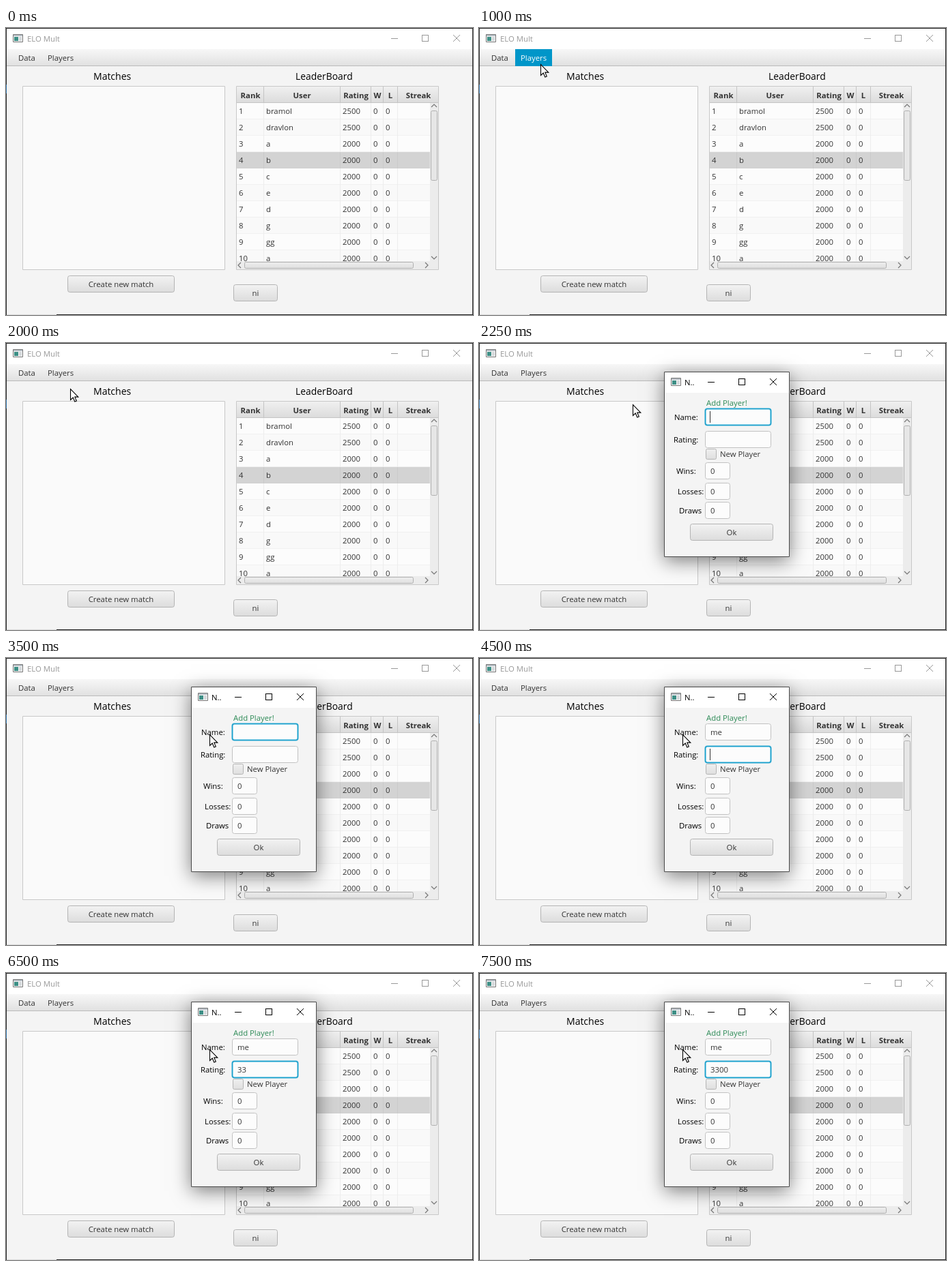
An HTML page with a canvas that plays this animation: 684x421 px, repeating every 8 s.

```html
<!DOCTYPE html>
<html lang="en">
<head>
<meta charset="utf-8">
<title>Ranking app</title>
<style>
  html, body { margin: 0; width: 100%; height: 100%; overflow: hidden; background: #222; }
  canvas { display: block; }
</style>
</head>
<body>
<canvas id="stage" width="684" height="421"></canvas>
<script>
const ctx = document.getElementById('stage').getContext('2d');
const BLUE = '#0096c9', BODY = '#f4f4f4', INK = '#333', DIM = '#999';

// Timelines: [start in ms, value...]; each value holds until the next entry.
const pointer = [[250, 291, 405], [500, 136, 141], [750, 113, 104], [1000, 90, 53],
  [1500, 92, 59], [1750, 94, 67], [2250, 225, 90], [2500, 298, 112]];
const nameText = [[0, ''], [4000, 'm'], [4250, 'me']];
const ratingText = [[0, ''], [5750, '3'], [6000, '33'], [6750, '330'], [7000, '3300']];
const caretShown = [[0, true], [2500, false], [3000, true], [3500, false], [4000, true],
  [5000, false], [5500, true], [6500, false], [6750, true], [7500, false]];
const at = (line, t) => line.filter(entry => entry[0] <= t).pop();

const users = ['bramol', 'dravlon', 'a', 'b', 'c', 'e', 'd', 'g', 'gg', 'a'];

function rect(x, y, w, h, fill) {
  ctx.fillStyle = fill;
  ctx.fillRect(x, y, w, h);
}

function box(x, y, w, h, fill, border, radius = 0) {
  ctx.beginPath();
  ctx.roundRect(x + .5, y + .5, w - 1, h - 1, radius);
  ctx.fillStyle = fill;
  ctx.fill();
  ctx.strokeStyle = border;
  ctx.lineWidth = 1;
  ctx.stroke();
}

function shade(y, h, top, bottom) {
  const g = ctx.createLinearGradient(0, y, 0, y + h);
  g.addColorStop(0, top);
  g.addColorStop(1, bottom);
  return g;
}

function text(str, x, y, color = INK, { size = 11.35, weight = 400, align = 'left' } = {}) {
  ctx.font = `${weight} ${size}px "Open Sans", "Noto Sans", sans-serif`;
  ctx.textAlign = align;
  ctx.fillStyle = color;
  ctx.fillText(str, x, y);
}

function path(points, color, width = 1) {
  ctx.beginPath();
  points.forEach(([x, y]) => ctx.lineTo(x, y));
  ctx.strokeStyle = color;
  ctx.lineWidth = width;
  ctx.stroke();
}

function withShadow(blur, dy, alpha, draw) {
  ctx.save();
  ctx.shadowColor = `rgba(0,0,0,${alpha})`;
  ctx.shadowBlur = blur;
  ctx.shadowOffsetY = dy;
  draw();
  ctx.restore();
}

function focusRing(x, y, w, h) {
  ctx.beginPath();
  ctx.roundRect(x, y, w, h, 3);
  ctx.strokeStyle = 'rgba(3,158,211,.25)';
  ctx.lineWidth = 3;
  ctx.stroke();
  ctx.strokeStyle = '#1a9fcb';
  ctx.lineWidth = 1.5;
  ctx.stroke();
}

function button(label, x, y, w, focused) {
  box(x, y, w, 25, shade(y, 25, '#f3f3f3', '#dcdcdc'), '#b4b4b4', 3);
  if (focused) focusRing(x + .5, y + .5, w - 1, 24);
  text(label, x + w / 2, y + 17, INK, { align: 'center' });
}

function windowIcon(x, y) {
  box(x, y, 15, 12, '#f5f5f5', '#777');
  rect(x + 1, y + 1, 13, 2, '#b5bdc4');
  rect(x + 2, y + 4, 6, 6, '#3d8f86');
  rect(x + 9, y + 4, 4, 6, '#d5d9dc');
}

// Minimise, maximise and close, each centred on its x
function windowButtons(xs, y, color) {
  const [min, max, close] = xs;
  path([[min - 5, y + .5], [min + 5, y + .5]], color);
  ctx.strokeRect(max - 4.5, y - 4.5, 9, 9);
  path([[close - 5, y - 5], [close + 5, y + 5]], color);
  path([[close + 5, y - 5], [close - 5, y + 5]], color);
}

function chevron(x, y, dx, dy) {
  path([[x - 2 * dx - 4 * dy, y - 2 * dy - 4 * dx], [x + 2 * dx, y + 2 * dy],
    [x - 2 * dx + 4 * dy, y - 2 * dy + 4 * dx]], '#777', 1.2);
}

function table() {
  box(337, 85, 297, 270, '#fafafa', '#c8c8c8');
  rect(338, 86, 295, 23, shade(86, 23, '#f0f0f0', '#dcdcdc'));
  rect(338, 109, 295, 1, '#c4c4c4');
  const edges = [377, 489, 534, 552, 573];
  edges.forEach(x => rect(x, 86, 1, 23, '#c4c4c4'));
  [['Rank', 358], ['User', 433.5], ['Rating', 512.5], ['W', 544], ['L', 563], ['Streak', 604]]
    .forEach(([s, x]) => text(s, x, 103, INK, { weight: 700, align: 'center' }));

  ctx.save();
  ctx.beginPath();
  ctx.rect(338, 110, 283, 232);
  ctx.clip();
  users.forEach((user, i) => {
    const y = 110 + i * 24;
    rect(338, y, 283, 24, i === 3 ? '#d3d3d3' : i % 2 ? '#f9f9f9' : '#fcfcfc');
    rect(338, y + 23, 283, 1, i === 3 ? '#d0d0d0' : '#f1f1f1');
    edges.forEach(x => rect(x, y, 1, 24, i === 3 ? '#cacaca' : '#ededed'));
    text(i + 1, 341, y + 16);
    text(user, 381, y + 16);
    text(i < 2 ? 2500 : 2000, 493, y + 16);
    text(0, 538, y + 16);
    text(0, 556, y + 16);
  });
  ctx.restore();

  rect(621, 110, 12, 244, '#ececec');
  rect(338, 342, 295, 12, '#ececec');
  box(622, 121, 10, 103, '#e6e6e6', '#b0b0b0', 2);
  box(349, 343, 248, 10, shade(343, 10, '#efefef', '#dedede'), '#b0b0b0', 2);
  chevron(627, 114, 0, -1);
  chevron(627, 337, 0, 1);
  chevron(342, 348, -1, 0);
  chevron(616, 348, 1, 0);
}

function mainWindow(t) {
  const active = t >= 1250 && t < 2000;
  const hover = t >= 1000 && t < 2000;
  rect(0, 0, 684, 421, '#222');
  rect(0, 83, 1, 13, '#2a6ea8');
  rect(1, 1, 682, 419, BODY);
  if (!active) rect(1, 420, 73, 1, '#dcdcdc');
  rect(1, 1, 682, 30, '#fff');
  windowIcon(10, 9);
  text('ELO Mult', 31, 20, active ? '#000' : DIM);
  windowButtons([569, 614, 660], 15, active ? '#000' : DIM);

  rect(1, 31, 682, 24, shade(31, 24, '#f7f7f7', '#e1e1e1'));
  rect(1, 55, 682, 1, '#bababa');
  if (hover) rect(53, 31, 54, 25, BLUE);
  text('Data', 18, 48);
  text('Players', 61, 48, hover ? '#fff' : INK);

  text('Matches', 128, 76, '#000', { size: 14 });
  text('LeaderBoard', 424, 76, '#000', { size: 13.9 });
  box(24, 85, 297, 270, '#fafafa', '#c8c8c8');
  table();
  button('Create new match', 90, 363, 157, active);
  button('ni', 333, 376, 65);
  if (active) menu(t >= 1750);
}

function menu(itemHover) {
  withShadow(12, 4, .35, () => rect(53, 56, 101, 58, '#fff'));
  box(53, 56, 101, 58, '#fafafa', '#b8b8b8');
  if (itemHover) rect(54, 60, 99, 25, BLUE);
  text('Add new player', 59, 77, itemHover ? '#fff' : INK);
  text('Search Player', 59, 102);
}

function field(value, x, y, w, focused, caret) {
  box(x, y, w, 25, '#fcfcfc', '#c2c2c2', 3);
  if (focused) focusRing(x + .5, y + .5, w - 1, 24);
  text(value, x + 8, y + 17);
  if (focused && caret) {
    const end = value ? ctx.measureText(value).width : -.5;
    rect(Math.round(x + 7.5 + end), y + 4, 1, 17, '#333');
  }
}

function dialog(t) {
  withShadow(26, 6, .5, () => rect(271, 42, 184, 272, '#fff'));
  box(271, 42, 184, 272, BODY, '#4a4a4a');
  rect(272, 43, 182, 30, '#fff');
  windowIcon(281, 51);
  text('N..', 301, 62, '#000');
  windowButtons([340, 385, 431], 57, '#000');

  text('Add Player!', 333, 92, '#2e8b57');
  [['Name:', 286, 113], ['Rating:', 285, 146], ['Wins:', 289, 192], ['Losses:', 291, 222], ['Draws', 293, 250]]
    .forEach(([s, x, y]) => text(s, x, y, '#000'));

  const onRating = t >= 4500, caret = at(caretShown, t)[1];
  field(at(nameText, t)[1], 331, 96, 97, !onRating, caret);
  field(at(ratingText, t)[1], 331, 129, 97, onRating, caret);
  box(332, 155, 16, 16, shade(155, 16, '#f0f0f0', '#dedede'), '#b4b4b4', 2);
  text('New Player', 353, 167);
  [175, 205, 233].forEach(y => field('0', 331, y, 37));
  button('Ok', 309, 265, 122);
}

function cursor(x, y) {
  const arrow = new Path2D('M.5 .5V16.5L4.2 13 6.8 19 9.3 18 6.8 12.1H11.8Z');
  ctx.save();
  ctx.translate(x, y);
  ctx.fillStyle = '#fff';
  ctx.fill(arrow);
  ctx.strokeStyle = '#000';
  ctx.lineWidth = 1.1;
  ctx.stroke(arrow);
  ctx.restore();
}

const start = performance.now();
function frame() {
  const t = (performance.now() - start) % 8000;
  mainWindow(t);
  if (t >= 2250) dialog(t);
  const spot = at(pointer, t);
  if (spot) cursor(spot[1], spot[2]);
  requestAnimationFrame(frame);
}
frame();
</script>
</body>
</html>
```
